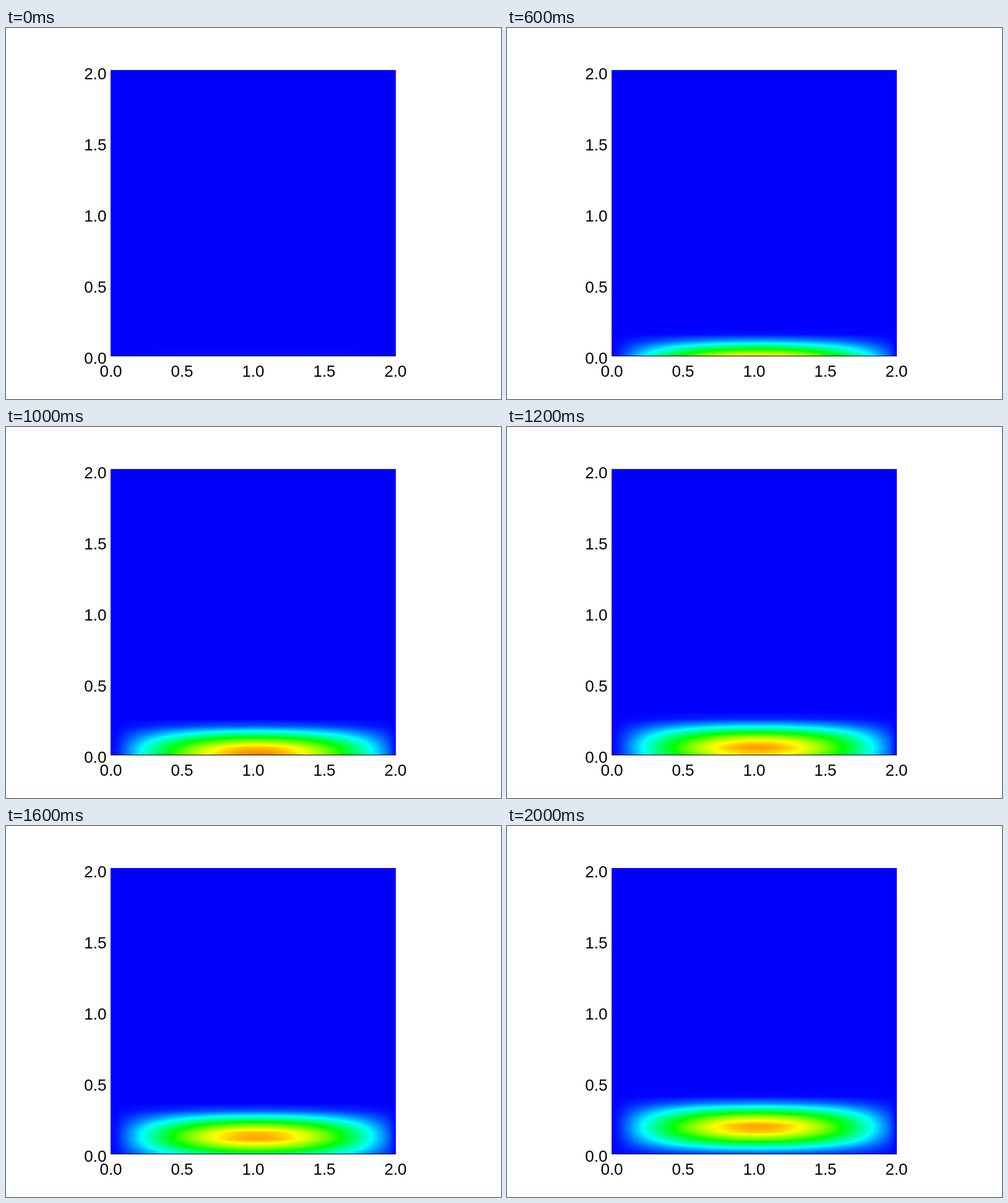
These frames come from a looping animation (800 by 600 pixels, 2.1 s). An HTML page with a canvas:

```html
<!DOCTYPE html>
<html lang="en">
<head>
<meta charset="utf-8">
<title>Advected pulse</title>
<style>
  html, body { margin: 0; width: 100%; height: 100%; overflow: hidden; background: #fff; }
  #stage { position: relative; width: 800px; height: 600px; overflow: hidden; }
  canvas, svg { position: absolute; left: 0; top: 0; display: block; }
  text { font: 26px "Liberation Sans", Arial, sans-serif; fill: #000; }
</style>
</head>
<body>
<div id="stage">
  <canvas id="field" width="800" height="600"></canvas>
  <svg id="axes" width="800" height="600" viewBox="0 0 800 600">
    <rect x="169" y="530" width="461" height="1"/>
  </svg>
</div>
<script>
const LEFT = 169, TOP = 68, WIDTH = 461, HEIGHT = 462;
const CELLS = 40, ROWS = 11;
const STEP_MS = 100, STEPS = 21;
const SPEED = 1 / 3;      // grid rows per step
const PEAK_STEP = 8.9;    // when the crest passes the lower edge
const TAIL = 13.7;        // half length of the pulse, in steps

const ctx = document.getElementById('field').getContext('2d');
const axes = document.getElementById('axes');
const lerp = (a, b, k) => a + (b - a) * k;

function label(value, x, y, anchor) {
  const node = document.createElementNS('http://www.w3.org/2000/svg', 'text');
  node.setAttribute('x', x);
  node.setAttribute('y', y);
  node.setAttribute('text-anchor', anchor);
  node.textContent = value.toFixed(1);
  axes.append(node);
}

for (let i = 0; i <= 4; i++) {
  label(i / 2, 162.5, 543 - i * 115, 'end');
  label(i / 2, 169.5 + i * 115, 564, 'middle');
}

// Cross profile: half a sine, held at zero on both walls
const across = Array.from({ length: CELLS + 1 }, (_, i) =>
  i % CELLS ? Math.sin(Math.PI * (i - 0.5) / CELLS) : 0);

const acrossPixels = Array.from({ length: WIDTH }, (_, px) => {
  const x = (px + 0.5) / WIDTH * CELLS;
  const i = Math.floor(x);
  return lerp(across[i], across[i + 1], x - i);
});

// Pulse height at a grid row; its front spreads while it enters
function along(row, step) {
  const age = step - row / SPEED - PEAK_STEP;
  const front = Math.min(TAIL, 9.86 + 0.48 * step);
  const phase = age / (age < 0 ? front : TAIL);
  if (Math.abs(phase) >= 1) return 0;
  const height = 0.855 + 0.035 * Math.max(0, 1 - row);
  return height * Math.cos(Math.PI / 2 * phase) ** 2;
}

// Blue, cyan, green, yellow, red
function paint(data, at, value) {
  const v = value * 4;
  data[at] = 255 * (v - 2);
  data[at + 1] = 255 * Math.min(v, 4 - v);
  data[at + 2] = 255 * (2 - v);
  data[at + 3] = 255;
}

const image = ctx.createImageData(WIDTH, HEIGHT);

function draw(step) {
  const rows = Array.from({ length: ROWS + 1 }, (_, j) => along(j, step));
  for (let py = 0; py < HEIGHT; py++) {
    const y = (HEIGHT - py - 0.5) / HEIGHT * CELLS;
    const j = Math.floor(y);
    const height = j < ROWS ? lerp(rows[j], rows[j + 1], y - j) : 0;
    for (let px = 0; px < WIDTH; px++) {
      paint(image.data, (py * WIDTH + px) * 4, height * acrossPixels[px]);
    }
  }
  ctx.putImageData(image, LEFT, TOP);
}

const start = performance.now();
let shown = -1;

function tick() {
  const step = Math.floor((performance.now() - start) / STEP_MS) % STEPS;
  if (step !== shown) draw(shown = step);
  requestAnimationFrame(tick);
}
tick();
</script>
</body>
</html>
```
